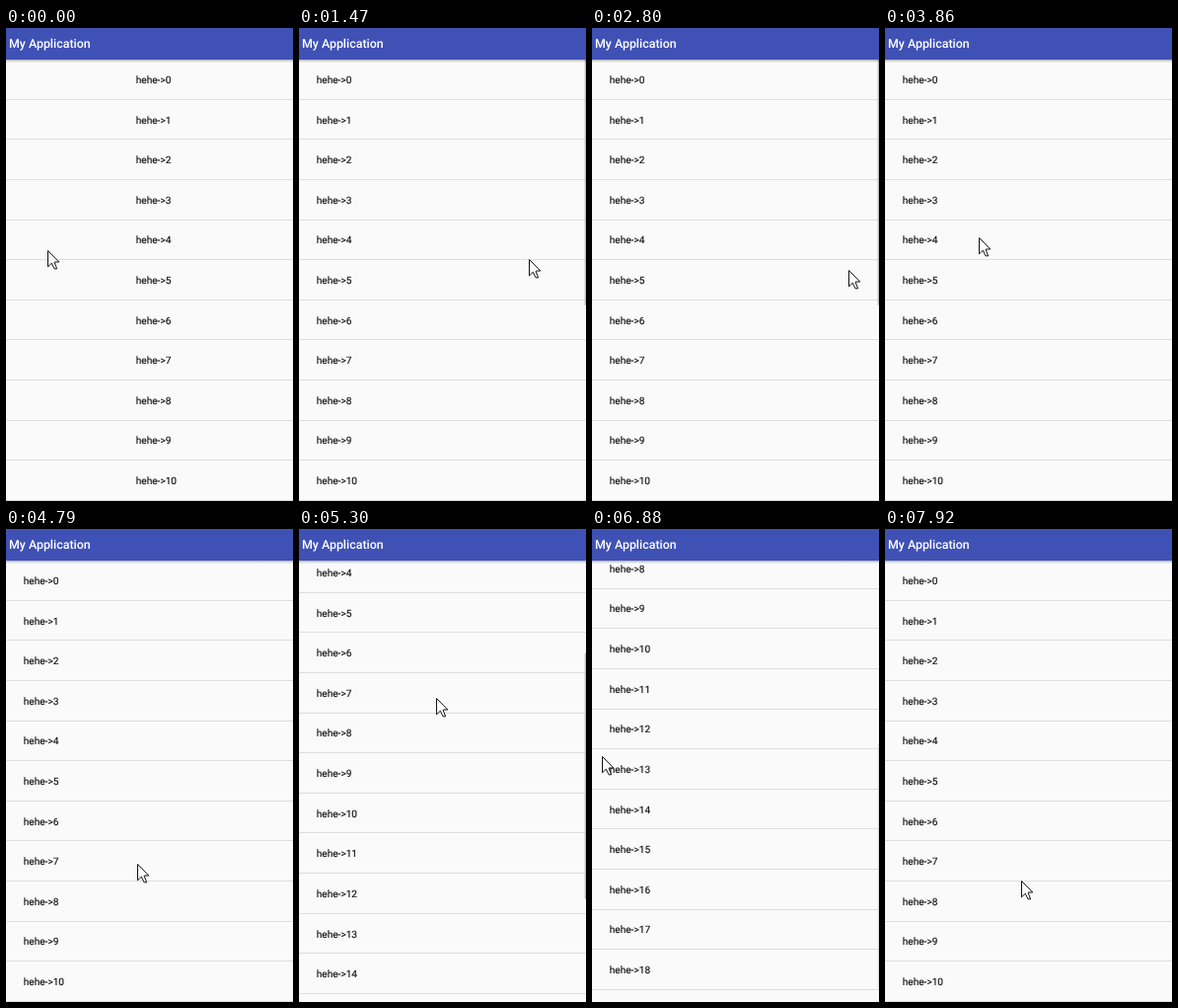
Animation of 291x479 px, one loop 8 s. Source, as an HTML page:

```html
<!DOCTYPE html>
<html lang="en">
<head>
<meta charset="utf-8">
<title>Elastic list</title>
<style>
  html, body { margin: 0; width: 100%; height: 100%; overflow: hidden; background: #fafafa; }
  svg { display: block; width: 291px; height: 479px; }
  text { font-family: Roboto, sans-serif; text-rendering: geometricPrecision; }
  .row text { font-size: 10.15px; fill: #111; stroke: #111; stroke-width: .15; }
  .row rect { fill: #dedede; }
</style>
</head>
<body>
<svg viewBox="0 0 291 479">
  <defs>
    <linearGradient id="shade" x2="0" y2="1">
      <stop stop-color="#000" stop-opacity=".28"/>
      <stop offset="1" stop-color="#000" stop-opacity="0"/>
    </linearGradient>
  </defs>
  <rect width="291" height="479" fill="#fafafa"/>
  <g id="list"></g>
  <rect id="bar" x="289.6" width="1.4" fill="#bebebe"/>
  <rect y="32" width="291" height="3" fill="url(#shade)"/>
  <rect width="291" height="32" fill="#3f51b5"/>
  <text x="3" y="19.8" font-size="12.4" font-weight="500" fill="#fff">My Application</text>
  <path id="cursor" d="M.5 .5V16.8L4.3 13.2L7 18.8H9.6L7.2 12.5V12H11.8Z" fill="#fff" stroke="#111"/>
</svg>
<script>
const LOOP = 8000, FRAME = LOOP / 60;
const TOP = 32, VIEW = 447, PITCH = 40.62, ROWS = 20, CONTENT = ROWS * PITCH;
const SNAP = 45, FADE = 250, LINGER = 500;

// Sideways drags stretch the rows, which snap back on release
const drags = [
  { start: -500, end: 0, reach: 114 },
  { start: 1470, end: 2000, reach: 134 },
  { start: 2810, end: 3200, reach: 144 },
  { start: 6100, end: 6530, reach: 132 }
];
const scrolls = [
  { start: 4900, end: 5760, reach: 337 },
  { start: 7000, end: 7360, reach: -337 }
];
// Where the hand turns or rests: time, x, y
const turns = [
  [0, 42, 225], [1467, 233, 234], [2000, 50, 228], [2800, 260, 245], [3333, 95, 212],
  [3867, 95, 212], [4867, 134, 341], [5333, 139, 171], [6100, 195, 225],
  [6600, 10, 230], [6933, 10, 230], [7130, 120, 150], [7400, 138, 356]
];

const $ = id => document.getElementById(id);
const clamp = v => Math.max(0, Math.min(1, v));
const smooth = v => (v = clamp(v), v * v * (3 - 2 * v));
const progress = (g, t) => smooth((t - g.start) / (g.end - g.start));
const sum = (items, value) => items.reduce((total, item) => total + value(item), 0);

const pullAt = t => sum(drags, d =>
  d.reach * progress(d, t) * Math.exp(-Math.max(0, t - d.end) / SNAP));
const scrollAt = t => sum(scrolls, s => s.reach * progress(s, t));

function barAlphaAt(t) {
  const glow = (from, to) => clamp((t - from) / 100) * clamp((to + LINGER - t) / FADE);
  return Math.max(
    ...drags.map(d => glow(d.start - FADE, d.start)),
    ...scrolls.map(s => glow(s.start - 100, s.end))
  );
}

function pointerAt(t) {
  const i = turns.findLastIndex(turn => turn[0] <= t);
  const a = turns[i], b = turns[i + 1] || a;
  const k = smooth((t - a[0]) / (b[0] - a[0] || 1));
  return [1, 2].map(n => Math.round(a[n] + (b[n] - a[n]) * k));
}

$('list').innerHTML = Array.from({ length: ROWS }, (_, i) =>
  `<g class="row"><text>hehe-&gt;${i}</text><rect width="291" height="1"/></g>`
).join('');
const rows = [...document.querySelectorAll('.row')];

function render(time) {
  // The screen refreshes in coarse, even steps
  const t = Math.floor((time + 60) / FRAME) * FRAME;
  const offset = scrollAt(t), x = 17.7 + pullAt(t);
  rows.forEach((row, i) => {
    const top = TOP + i * PITCH - offset;
    const [label, line] = row.children;
    label.setAttribute('x', x);
    label.setAttribute('y', top + 23.9);
    line.setAttribute('y', Math.floor(top + PITCH - .4));
  });
  const bar = $('bar');
  bar.setAttribute('y', TOP + offset * VIEW / CONTENT);
  bar.setAttribute('height', VIEW * VIEW / CONTENT + 3);
  bar.setAttribute('opacity', barAlphaAt(t));
  $('cursor').setAttribute('transform', `translate(${pointerAt(t)})`);
}

const began = performance.now();
function tick() {
  render((performance.now() - began) % LOOP);
  requestAnimationFrame(tick);
}
tick();
</script>
</body>
</html>
```
